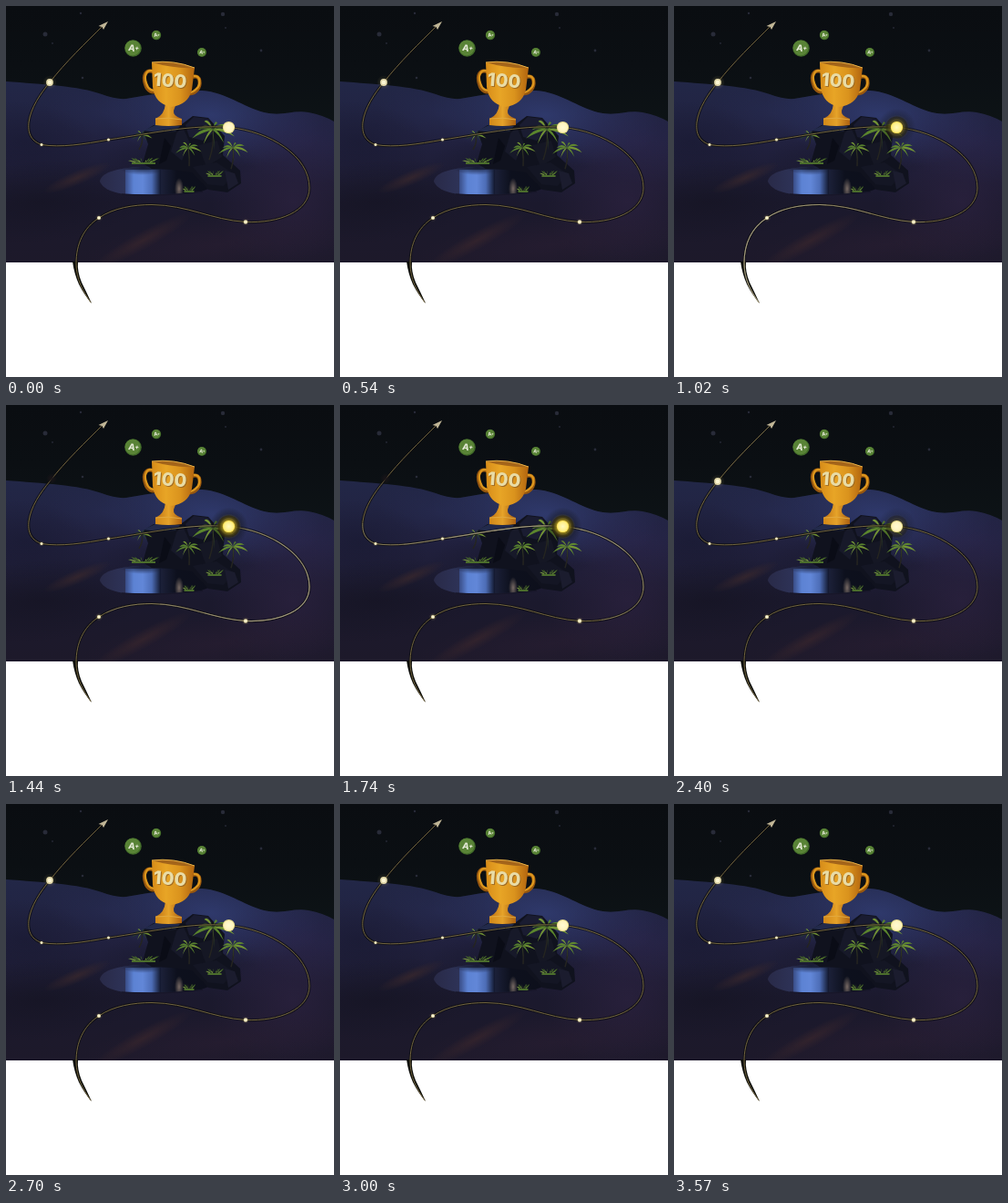
An HTML page with a canvas for the animation above (3.6 s loop, 360x408 px).

```html
<!DOCTYPE html>
<html lang="en">
<head>
<meta charset="utf-8">
<title>Desert trophy</title>
<style>
html, body { margin: 0; width: 100%; height: 100%; overflow: hidden; background: #fff; }
canvas { display: block; width: 360px; height: 408px; }
</style>
</head>
<body>
<canvas id="stage" width="360" height="408"></canvas>
<script>
const W = 360, H = 408, LOOP = 3600, GROUND = 282;
const stage = document.getElementById('stage').getContext('2d');
const backdrop = document.createElement('canvas');
backdrop.width = W;
backdrop.height = H;
let g = backdrop.getContext('2d');

const trail = new Path2D('M93 326C84 313 77 300 77 283C77 262 85 244 102 233' +
  'C118 222 140 218.5 160 218.5C200 219 225 235 263 237.5C300 239 333 226 333 200' +
  'C333 165 290 138 245 133.5C205 130 160 140 113 147C85 152 60 156 39 152.5' +
  'C26 148 24 138 25 128C27 112 38 96 48 84C65 62 88 40 106 22');

const clamp = x => Math.max(0, Math.min(1, x));
const smooth = (a, b, x) => { const u = clamp((x - a) / (b - a)); return u * u * (3 - 2 * u); };
const pulse = (a, b, c, d, t) => smooth(a, b, t) * (1 - smooth(c, d, t));

function shape(d, fill) {
  g.fillStyle = fill;
  g.fill(new Path2D(d));
}
function line(d, color, width) {
  g.strokeStyle = color;
  g.lineWidth = width;
  g.stroke(d instanceof Path2D ? d : new Path2D(d));
}
function disc(x, y, r, fill) {
  g.fillStyle = fill;
  g.beginPath();
  g.arc(x, y, r, 0, 7);
  g.fill();
}
function gradient(x0, y0, x1, y1, ...colors) {
  const grad = g.createLinearGradient(x0, y0, x1, y1);
  colors.forEach((c, i) => grad.addColorStop(i / (colors.length - 1), c));
  return grad;
}
function haze(x, y, rx, ry, angle, rgb, alpha) {
  g.save();
  g.translate(x, y);
  g.rotate(angle);
  g.scale(rx, ry);
  const grad = g.createRadialGradient(0, 0, 0, 0, 0, 1);
  grad.addColorStop(0, `rgba(${rgb},${alpha})`);
  grad.addColorStop(1, `rgba(${rgb},0)`);
  disc(0, 0, 1, grad);
  g.restore();
}
function label(text, x, y, size, angle, color) {
  g.save();
  g.translate(x, y);
  g.rotate(angle);
  g.font = `800 ${size}px Inter, sans-serif`;
  g.textAlign = 'center';
  g.textBaseline = 'middle';
  g.fillStyle = color;
  g.fillText(text, 0, 0);
  g.restore();
}

function landscape() {
  g.fillStyle = gradient(0, 0, 0, 130, '#0a0d11', '#0b0f13', '#0d1316');
  g.fillRect(0, 0, W, GROUND);
  for (const [x, y, r] of [[43, 31, 2.5], [82, 8, 1.2], [84, 79, 1.3], [51, 41, .9],
                          [238, 9, 2.2], [241, 24, .9], [280, 49, 1.4]])
    disc(x, y, r, '#282b38');

  g.save();
  g.clip(new Path2D('M0 83C40 86 80 88 105 97Q120 103 132 102C160 97 185 93 215 93' +
    'C242 95 260 111 283 117C304 122 314 114 332 117Q348 120 360 127V282H0Z'));
  g.fillStyle = gradient(0, 83, 0, 282, '#222747', '#21213f', '#1b192d', '#1d192a');
  g.fillRect(0, 80, W, 202);
  haze(225, 120, 125, 55, .12, '50,62,117', .8);
  haze(112, 118, 70, 30, .15, '40,45,85', .5);
  haze(325, 150, 85, 45, .15, '42,39,78', .6);
  haze(315, 215, 90, 80, 0, '46,35,66', .65);
  haze(20, 150, 80, 45, .1, '22,23,45', .5);
  haze(40, 215, 120, 45, -.1, '20,19,33', .6);
  haze(190, 170, 90, 28, 0, '21,21,39', .5);
  haze(235, 262, 150, 32, -.1, '44,31,52', .5);
  haze(150, 258, 62, 10, -.5, '68,43,44', .5);
  haze(78, 189, 40, 8, -.4, '66,44,44', .6);
  g.restore();
}

function pond() {
  const water = new Path2D('M103 193C104 182 127 177 153 177L226 183Q238 197 214 204Q174 209 127 206.5Q107 203 103 193Z');
  g.save();
  g.clip(water);
  g.fillStyle = gradient(103, 0, 230, 0, '#292a48', '#30375f', '#0d101d', '#0d0f1b');
  g.fillRect(100, 170, 140, 45);
  g.fillStyle = gradient(130, 0, 170, 0, '#35467d', '#5c82d3', '#6287d8', '#4d6db6', '#11162b');
  g.fillRect(131, 180, 39, 30);
  haze(150, 177, 28, 9, 0, '22,27,51', 1);
  haze(190, 201, 5, 12, 0, '146,128,118', .8);
  g.restore();
  line('M127 207Q175 210 216 204.5', '#171628', 1.2);
}

function rocks() {
  shape('M150 173L156 152L151 138L162 131L193 130L205 121L222 123L240 143L238 164L257 181L258 195L243 205L222 202L204 183L181 180L160 179Z', '#10121e');
  shape('M151 137L164 131L191 132L186 138L166 139Z', '#222a4b');
  shape('M197 131L206 122L222 124L230 138L216 148L201 144Z', '#1a1c31');
  shape('M187 140L194 133L202 151L193 170L181 160Z', '#171929');
  shape('M211 153L232 148L237 166L220 177Z', '#151724');
  shape('M205 177L231 172L249 184L239 198L221 196Z', '#141624');
  shape('M240 181L251 184L255 195L244 202Z', '#1b1c2e');
  shape('M174 145L181 154L176 170L168 174Z', '#0a0c16');
}

function leaf(x, y, dx, dy, lift, width, color) {
  shape(`M${x} ${y}q${dx * .5} ${dy * .5 - lift} ${dx} ${dy}q${-dx * .4} ${-dy * .4 - lift + width} ${-dx} ${-dy}`, color);
}
function palm(x, y, r, color, trunk) {
  line(`M${x} ${y}q2 ${r * .7} ${trunk} ${r * 1.45}`, '#252521', 1.5);
  for (let i = 0; i < 9; i++) {
    const a = i * Math.PI * 2 / 9 + .1;
    const reach = r * (.9 + .15 * Math.cos(i * 3));
    leaf(x, y, Math.cos(a) * reach, Math.sin(a) * reach * .7 + r * .25, r * .4, r * .3, i % 3 ? color : '#739435');
  }
}
function grass(x, y, width) {
  for (let i = 0; i < 11; i++) {
    const spread = (i / 10 - .5) * width;
    leaf(x + spread * .4, y, spread * .7, -3 - 3 * Math.abs(Math.sin(i * 2.1)), 3, 3.4, i % 3 ? '#4b6e29' : '#789540');
  }
  line(`M${x - width * .42} ${y}h${width * .84}`, '#4b6d2c', 2);
}

function plants() {
  palm(149, 142, 11, '#29412c', -3);
  palm(227, 136, 23, '#5b852d', -4);
  palm(200, 156, 14, '#567f2e', 1);
  palm(249, 156, 16, '#5f862f', -2);
  grass(151, 173, 31);
  grass(229, 187, 18);
  grass(201, 204, 13);
}

function trophy() {
  line('M163 73C153 68 150 77 153 86C155 94 161 96 166 93', '#96560f', 4);
  line('M163 72C154 68 151 77 154 85C156 92 161 94 165 92', '#dc961d', 2.4);
  line('M205 78C214 75 214 87 210 92Q206 97 201 96', '#96560f', 4);
  line('M206 77C215 76 213 88 209 91Q205 95 202 95', '#dc961d', 2.4);
  shape('M175 107H187L184 115Q183 121 193 124V131H164V124Q174 120 175 107Z',
    gradient(164, 0, 193, 0, '#bd6f12', '#e6a329', '#a85c10'));
  shape('M164 124Q179 121 193 125V131Q178 133 164 131Z',
    gradient(164, 0, 193, 0, '#d18818', '#e4a12a', '#ac6111'));
  shape('M160 62Q185 60 207 68L204 92Q200 109 181 111Q163 107 161 89Z',
    gradient(160, 0, 207, 0, '#d78c19', '#e8a526', '#da931d', '#b1640f'));
  shape('M160 62Q184 59 207 68Q184 69 160 62Z', '#a4651a');
  line('M160 62Q184 59 207 68', '#e9b044', 1);
  line('M164 124Q179 122 193 125', '#e4ac42', .9);
  label('100', 181, 84, 20, .08, '#a06b22');
  label('100', 180, 83, 20, .08, '#e9dca6');
}

function badge(x, y, r, angle) {
  disc(x, y, r, '#416a29');
  disc(x - r * .05, y - r * .05, r * .9, '#598336');
  label('A', x - r * .15, y, r * 1.05, angle, '#e3e8d5');
  label('+', x + r * .45, y - r * .02, r * .75, angle, '#e3e8d5');
}

function dot(x, y, r, glow) {
  haze(x, y, r * 2, r * 2, 0, '205,185,104', .25 + glow * .2);
  disc(x, y, r, '#e2d8aa');
  disc(x, y, r * .6, '#fbf5d3');
}

function trailLine(t) {
  g.lineCap = 'round';
  g.lineJoin = 'round';
  g.save();
  g.beginPath();
  g.rect(0, 0, W, GROUND);
  g.clip();
  line(trail, 'rgba(13,13,15,.7)', 3);
  g.restore();
  shape('M73 281Q75 295 80 306Q86 318 94 327Q88 314 83 304Q78 292 79 281Z', '#0c0d0a');
  line(trail, '#72653f', 1);

  // Nested dashes make a soft highlight that travels up the trail.
  const strength = pulse(600, 1000, 2050, 2500, t);
  if (!strength) return;
  const center = (t - 900) * .6;
  g.save();
  g.lineCap = 'butt';
  g.globalAlpha = strength * .2;
  for (const length of [420, 300, 200, 100]) {
    const start = center - length / 2;
    g.setLineDash([0, Math.max(0, start), length + Math.min(0, start), 3000]);
    line(trail, '#c9c4aa', 1.1);
  }
  g.restore();
}

function orb(x, y, glow) {
  if (glow) {
    const shade = Math.sqrt(glow);
    haze(x, y, 21, 21, 0, '14,14,12', shade);
    disc(x, y, 12, `rgba(18,17,11,${shade * .65})`);
    haze(x, y, 14, 14, 0, '205,174,25', glow * .8);
    haze(x, y, 10, 10, 0, '255,222,50', glow);
  }
  disc(x, y, 6.6, glow > .3 ? '#ffe45e' : '#eadc8c');
  disc(x, y, 5.6, glow > .3 ? '#fff087' : '#fff3bd');
  haze(x, y, 5, 5, 0, '255,255,225', .6);
}

function draw(t) {
  g = stage;
  g.clearRect(0, 0, W, H);
  g.drawImage(backdrop, 0, 0);
  const glow = pulse(540, 1500, 1950, 2600, t);
  trailLine(t);
  shape('M112 17L107 26L105.5 23L101.5 22Z', '#c0b596');
  dot(102, 233, 2.1, glow);
  dot(263, 237.5, 2.2, glow);
  dot(112.5, 147, 1.5, glow);
  dot(39, 152.5, 1.5, glow);

  const hidden = pulse(1170, 1350, 2070, 2250, t);
  if (hidden) haze(50, 81, 6, 6, 0, '26,21,24', hidden);
  g.save();
  g.globalAlpha = 1 - hidden;
  dot(48, 84, 3.9, glow);
  g.restore();
  orb(244.5, 133.5, glow);
}

landscape();
pond();
rocks();
plants();
trophy();
badge(139.5, 46.5, 9.3, .2);
badge(165, 32, 5.2, -.15);
badge(215, 51, 5, .15);

function frame(now) {
  draw(now % LOOP);
  requestAnimationFrame(frame);
}
draw(0);
requestAnimationFrame(frame);
</script>
</body>
</html>
```
